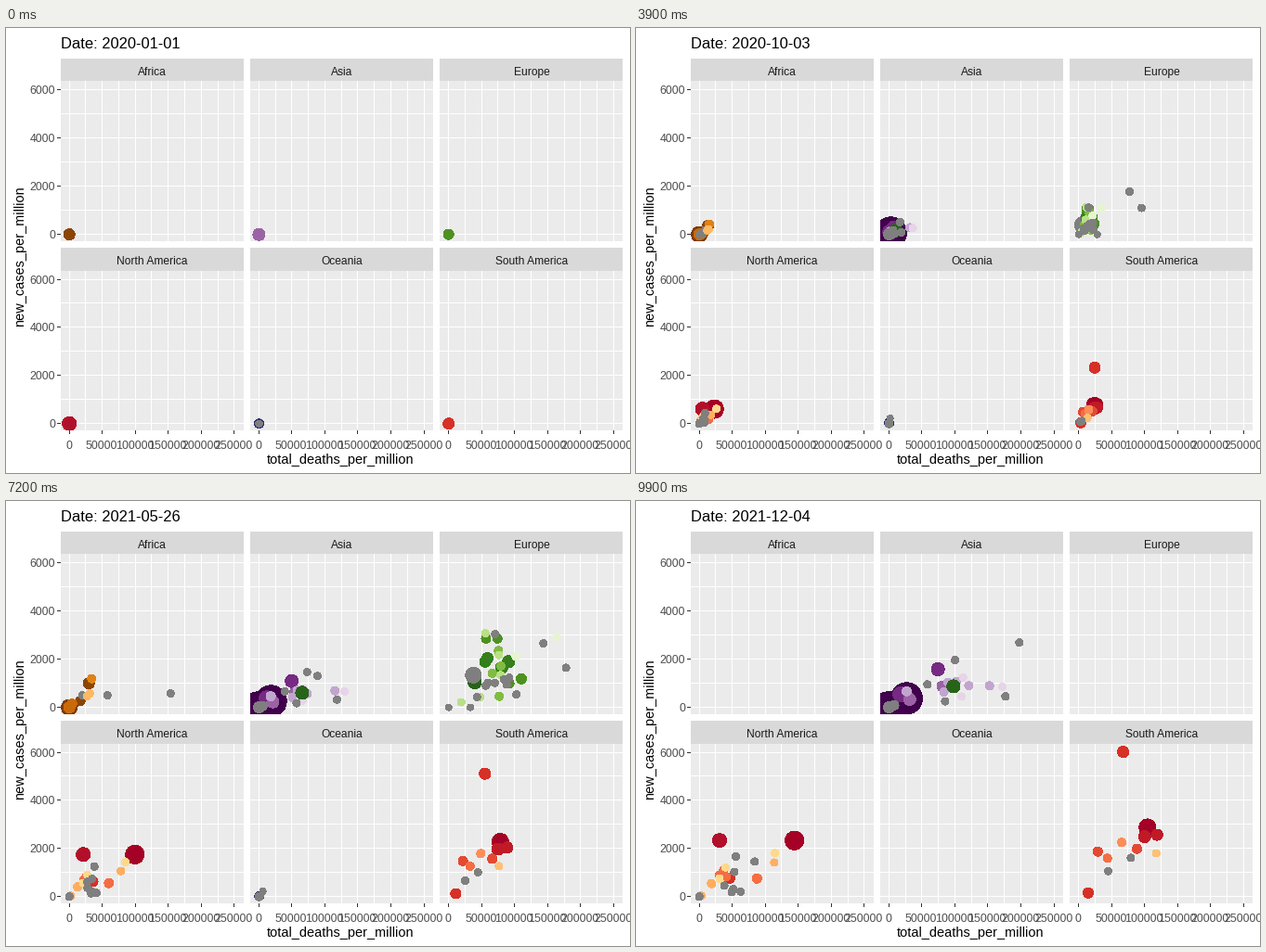
These frames come from a looping animation (672 px wide and 480 px high, 10000 ms). A matplotlib script:

```python
import numpy as np
import matplotlib.pyplot as plt
from matplotlib.animation import FuncAnimation
from matplotlib.patches import Rectangle

W, H, DPI = 672, 480, 96
FRAMES = 100
LAST = FRAMES - 1
GREY = "#7F7F7F"
X_STEP, Y_STEP = 17.76, 25.982          # half a major grid interval
KEYS = (0, 17, 39, 56, 72, 91, 99)      # frames at which growth is known

rng = np.random.default_rng(4)
plt.rcParams["font.family"] = ["Liberation Sans", "DejaVu Sans"]
fig = plt.figure(figsize=(W / DPI, H / DPI), dpi=DPI, facecolor="white")
ax = fig.add_axes([0, 0, 1, 1])
ax.set_xlim(0, W)
ax.set_ylim(H, 0)
ax.axis("off")


def box(x0, y0, x1, y1, color):
    """Fill a rectangle whose corners are snapped to whole pixels."""
    x0, y0, x1, y1 = (round(v) for v in (x0, y0, x1, y1))
    r = Rectangle((x0, y0), x1 - x0, y1 - y0, fc=color, lw=0,
                  antialiased=False)
    ax.add_patch(r)
    return r


def label(x, y, s, px, color="black", **kw):
    return ax.text(x, y, s, fontsize=px * 72 / DPI, color=color, **kw)


def panel(name, col, row):
    """Draw strip, background, grid and ticks; return area and zero point."""
    x, y = 58.95 + 204.26 * col, 57.45 + 204.1 * row
    right, bottom = x + 197, y + 172.7
    zx, zy = x + 8.73, y + 164.85
    box(x, y - 24.2, right, y, "#D9D9D9")
    label((x + right) / 2, y - 6.5, name, 12, "#1A1A1A", ha="center")
    area = box(x, y, right, bottom, "#EBEBEB")
    for i in range(11):
        gx = round(zx + X_STEP * i)
        box(gx, y, gx + 1, bottom, "white")
        if row and i % 2 == 0:
            box(gx, bottom, gx + 1, bottom + 4, "#333333")
            label(gx, 454, str(25000 * i), 12.4, "#4D4D4D", ha="center")
    for i in range(7):
        gy = round(zy - Y_STEP * i)
        box(x, gy, right, gy + 1, "white")
        if col == 0 and i % 2 == 0:
            box(x - 4, gy, x, gy + 1, "#333333")
            label(53, gy + 5, str(1000 * i), 12.4, "#4D4D4D", ha="right")
    return area, (zx + 0.5, zy + 0.3)


def swarm(n, r, x, y, dx, dy):
    """Small dots scattered about (x, y), each growing at its own pace."""
    px = np.clip(rng.normal(x, dx, n), 2, None)
    py = np.clip(rng.normal(y, dy, n), 2, None)
    return list(zip([r] * n, px, py, rng.uniform(0.8, 1.3, n)))


class Cloud:
    """Dots of one panel, moving out from zero along shared growth curves.

    Each dot is (radius, right, up[, pace]); right and up are pixels from
    zero at full growth, and a pace above 1 delays the rise.
    """

    def __init__(self, name, col, row, grow_x, grow_y, groups, hidden=()):
        area, (zx, zy) = panel(name, col, row)
        rows = [(color, start, *dot, 1)[:6]
                for color, start, dots in groups for dot in dots]
        colors, self.start, r, x, y, pace = map(np.array, zip(*rows))
        f = np.arange(FRAMES)[:, None]
        gx = np.interp(f, KEYS, (0, *grow_x)) ** pace
        gy = np.interp(f, KEYS, (0, *grow_y)) ** pace
        self.track = np.stack([zx + x * gx, zy - y * gy], axis=2)
        self.size = (r * 2 * 72 / DPI) ** 2
        self.hidden = hidden
        self.art = ax.scatter(*self.track[0].T, s=self.size, c=colors,
                              linewidths=0, antialiaseds=False, zorder=3)
        self.art.set_clip_path(area)

    def draw(self, f):
        shown = (self.start <= f) & (f not in self.hidden)
        self.art.set_offsets(self.track[f])
        self.art.set_sizes(self.size * shown)


africa = [
    ("#7F3B08", 7, [(8.5, 0, 0), (6, 3, 2)]),
    ("#8C4500", 0, [(6, 21, 26), (5, 12, 7)]),
    ("#C96A0A", 8, [(6, 0, 0), (5, 3, 4)]),
    ("#E08214", 8, [(4.5, 24, 31)]),
    (GREY, 10, [(4, 14, 13), (4, 41, 13, 3), (4, 109, 15, 7)]),
    ("#FDB863", 10, [(4, 22, 15), (4, 19, 12)]),
]

asia = [
    ("#40004B", 4, [(17, 0, 0), (17, 17, 9)]),
    ("#762A83", 7, [(7, 47, 38), (8, 11, 13)]),
    ("#9B63A5", 0, [(6.5, 20, 8), (5.5, 51, 21)]),
    ("#C2A5CF", 9, [(4.5, 100, 22, 0.7), (5, 17, 16)]
     + swarm(4, 4.5, 58, 25, 10, 6)),
    ("#E7D4E8", 9, [(4, 113, 21, 0.7)] + swarm(2, 4, 65, 18, 8, 5)),
    ("#276419", 9, [(7, 62, 21)]),
    (GREY, 7, [(6, 0, 0), (5, 5, 2)]),
    (GREY, 12, [(4, 65, 48, 0.8), (4, 112, 60, 2), (4, 112, 11),
                (4, 54, 6), (4, 37, 23)]),
]

europe = [
    ("#276419", 8, [(7, 37, 29)]),
    (GREY, 7, [(8.5, 37, 38, 1.2)]),
    ("#35801C", 8, [(6.5, 85, 53), (6.5, 75, 46), (6, 55, 57), (6, 52, 53)]),
    ("#4D9221", 0, [(5.5, 103, 33)]),
    ("#4D9221", 10, [(5, 69, 80), (5, 53, 80), (5, 86, 28)]),
    ("#7FBC41", 10, swarm(4, 4.5, 80, 42, 15, 16)),
    ("#B8E186", 10, [(4, 18, 6), (4, 45, 12), (4, 52, 86)]
     + swarm(2, 4, 75, 52, 8, 10)),
    ("#E6F5D0", 11, [(4, 153, 82), (4, 95, 59)]),
    (GREY, 11, [(3.5, 0, 0), (3.5, 24, 0, 0.1), (4, 141, 44, 0.4),
                (4, 114, 71, 0.4), (4, 66, 85), (4, 96, 15), (4, 40, 12)]
     + swarm(6, 4, 70, 36, 17, 13)),
]

north = [
    ("#A50026", 5, [(10, 94, 56)]),
    ("#B2102A", 0, [(7.5, 20, 56)]),
    ("#D73027", 9, [(5.5, 31, 19, 0.7)]),
    ("#F46D43", 10, [(5, 57, 18)] + swarm(3, 4.5, 24, 21, 3, 4)),
    ("#FDAE61", 10, [(4, 74, 34), (4.5, 12, 13), (4, 2, 1)]),
    ("#FED98B", 10, [(4, 76, 44, 0.8), (4, 20, 18), (4, 26, 29)]),
    (GREY, 12, [(4, 0, 0), (4, 36, 40), (4, 46, 30, 3)]
     + swarm(5, 4, 32, 12, 7, 6)),
]

south = [
    ("#A50026", 8, [(9, 72, 74)]),
    ("#C01A27", 9, [(6.5, 69, 64), (6, 82, 66)]),
    ("#D73027", 0, [(6, 47, 155, 0.7), (5.5, 10, 4)]),
    ("#E34A33", 9, [(5, 61, 51), (5, 20, 48)]),
    ("#F46D43", 10, [(4.5, 30, 41)]),
    ("#FC8D59", 10, [(4.5, 45, 58)]),
    ("#FDC077", 10, [(4, 80, 46, 1.5)]),
    (GREY, 11, [(4, 53, 41, 2), (4, 30, 27, 2)]),
]

oceania = [
    ("#2B3173", 0, [(5, 4, 2)]),
    (GREY, 0, [(3.7, 0, 0)]),
    (GREY, 8, [(4.5, 2, 0), (3.5, 41, 19)]),
]

clouds = [
    Cloud("Africa", 0, 0, (0.02, 0.45, 0.8, 1, 1.1, 1.2),
          (0.02, 0.35, 0.8, 1, 1.1, 1.2), africa,
          hidden=(*range(86, 93), LAST)),
    Cloud("Asia", 1, 0, (0.02, 0.12, 0.36, 0.75, 1, 1.12),
          (0.05, 0.2, 0.42, 0.75, 1, 1.08), asia),
    Cloud("Europe", 2, 0, (0.04, 0.16, 0.45, 0.76, 1, 1.15),
          (0.24, 0.34, 0.65, 0.93, 1, 1.06), europe, hidden=(LAST,)),
    Cloud("North America", 0, 1, (0.02, 0.17, 0.57, 0.75, 1, 1.09),
          (0.1, 0.28, 0.62, 0.81, 1, 1.08), north),
    Cloud("Oceania", 1, 1, (0, 0.03, 0.06, 0.1, 1, 1.2),
          (0, 0.3, 0.3, 0.3, 1, 1.2), oceania, hidden=(LAST,)),
    Cloud("South America", 2, 1, (0.03, 0.24, 0.45, 0.77, 1, 1.03),
          (0.02, 0.26, 0.4, 0.8, 1, 1.01), south),
]

label(360.5, 470, "total_deaths_per_million", 14.5, ha="center")
label(22, 246.5, "new_cases_per_million", 14.5, rotation=90,
      ha="right", va="center")
title = label(59, 22, "", 16.5)


def update(f):
    day = np.datetime64("2020-01-01") + 703 * f // LAST
    title.set_text(f"Date: {day}")
    for c in clouds:
        c.draw(f)
    return [title] + [c.art for c in clouds]


anim = FuncAnimation(fig, update, frames=FRAMES, interval=100,
                     repeat=True, repeat_delay=0)
plt.show()
```
